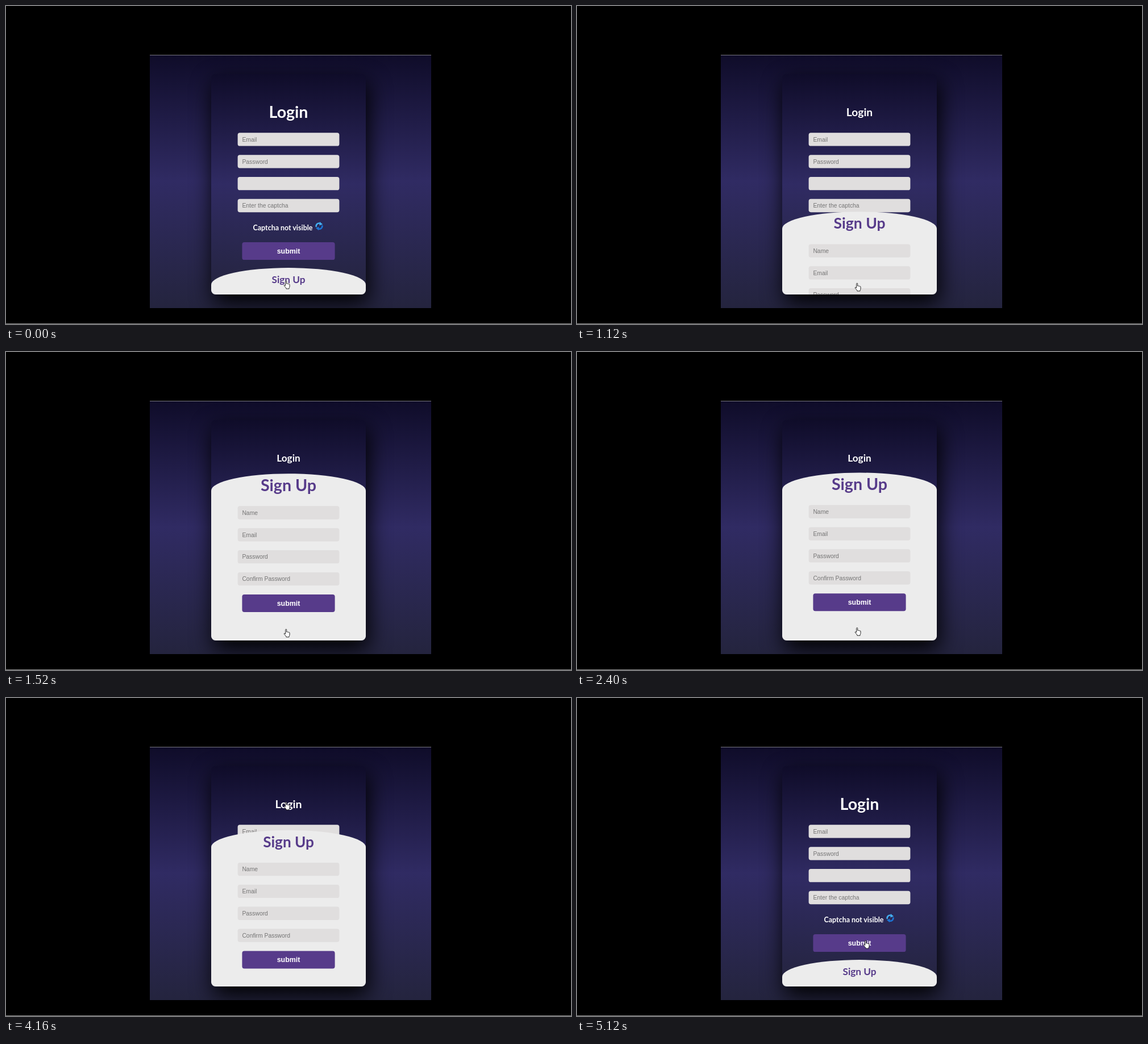
These frames come from a looping animation (994 by 560 pixels, 5.2 s). An HTML page:

```html
<!DOCTYPE html>
<html lang="en">
<head>
<meta charset="utf-8">
<title>Login and sign up</title>
<style>
  html, body { margin: 0; width: 100%; height: 100%; overflow: hidden; background: #000; }
  svg { display: block; width: 994px; height: 560px; }
  text { text-anchor: middle; }
  .title { font: 700 28.6px Lato, sans-serif; }
  .note { font: 700 12.43px Lato, sans-serif; fill: #fff; }
  .hint { font: 10.36px "Liberation Sans", Arial, sans-serif; fill: #757575; text-anchor: start; }
  .action { font: 700 12.43px "Liberation Sans", Arial, sans-serif; fill: #fff; }
  .shadow { filter: blur(19.4px); }
</style>
</head>
<body>
<svg viewBox="0 0 994 560">
  <defs>
    <linearGradient id="night" x2="0" y2="1">
      <stop stop-color="#0f0c29"/>
      <stop offset=".5" stop-color="#302b63"/>
      <stop offset="1" stop-color="#24243e"/>
    </linearGradient>
    <clipPath id="scene"><rect x="253" y="86" width="495" height="446"/></clipPath>
    <clipPath id="card"><rect x="361" y="119.5" width="272" height="388.5" rx="7.8"/></clipPath>
  </defs>
  <rect width="994" height="560"/>
  <rect y="559" width="994" height="1" fill="#8c8c8c"/>
  <g clip-path="url(#scene)">
    <rect x="253" y="86" width="495" height="446" fill="url(#night)"/>
    <rect x="253" y="86" width="495" height="1" fill="#77757f"/>
    <rect class="shadow" x="365" y="135" width="272" height="388.5" rx="7.8"/>
  </g>
  <g clip-path="url(#card)">
    <rect x="361" y="119.5" width="272" height="388.5" fill="url(#night)"/>
    <g id="login" transform="translate(361 166.2)"></g>
    <g id="signup"></g>
  </g>
  <path id="cursor" fill="#fff" stroke="#111" stroke-width=".9" stroke-linejoin="round"
    d="M3.2 9V1.7a1 1 0 0 1 2 0V5.6q.9-.8 1.8.2q1-.6 1.8.4q1.6-.5 1.7 1v3.3q-.2 1.6-1 2.6v1.4H4.4v-1.2L1 9.4q-.7-1.4.5-1.6q.9.1 1.7 1.2z"/>
</svg>
<script>
const LOOP = 5200, STEP = 80;
const $ = id => document.getElementById(id);

const title = (id, label, fill) =>
  `<g id="${id}"><text class="title" y="9.9" fill="${fill}">${label}</text></g>`;
const field = (hint, i) => {
  const y = 57.1 + 38.85 * i;
  return `<rect x="46.6" y="${y}" width="178.8" height="23.3" rx="3.9" fill="#e0dede"/>
    <text class="hint" x="54.4" y="${y + 15.4}">${hint}</text>`;
};
const button = y => `<rect x="54.4" y="${y}" width="163.2" height="31" rx="3.9" fill="#573b8a"/>
  <text class="action" x="136" y="${y + 20}">submit</text>`;
const arrow = (turn, color) => `<g transform="rotate(${turn})" fill="none" stroke="${color}">
  <path stroke-width="2.6" d="M-5.2 1.4A5.2 5.2 0 0 1 1.8-4.7"/>
  <path stroke="none" fill="${color}" d="M1-7.6L6.2-3.2L.2-1.2z"/></g>`;

$('login').innerHTML = title('loginTitle', 'Login', '#fff') +
  ['Email', 'Password', '', 'Enter the captcha'].map(field).join('') +
  '<text class="note" x="126" y="229.2">Captcha not visible</text>' +
  `<g transform="translate(190 221.4)">${arrow(0, '#43aef2')}${arrow(180, '#1c74d4')}</g>` +
  button(249.9);

$('signup').innerHTML = '<path fill="#ececec" d="M0 29.8A136 29.8 0 0 1 272 29.8V357H0z"/>' +
  title('signupTitle', 'Sign Up', '#573b8a') +
  ['Name', 'Email', 'Password', 'Confirm Password'].map(field).join('') +
  button(212.7);

// cubic-bezier(.42, 0, .58, 1), solved by bisection
function easeInOut(x) {
  if (x <= 0) return 0;
  if (x >= 1) return 1;
  let lo = 0, hi = 1, s;
  for (let i = 0; i < 24; i++) {
    s = (lo + hi) / 2;
    const bx = 1.26 * s * (1 - s) ** 2 + 1.74 * s * s * (1 - s) + s ** 3;
    if (bx < x) lo = s; else hi = s;
  }
  return s * s * (3 - 2 * s);
}

const OPEN = 768, CLOSE = 4000;
const opened = (t, duration) =>
  easeInOut((t - OPEN) / duration) - easeInOut((t - CLOSE) / duration);

// Pointer centre: time, x, y
const route = [
  [0, 494, 491], [80, 494, 494], [160, 494, 495], [2320, 494, 495], [2560, 494, 487],
  [2960, 494, 487], [3040, 494, 478], [3200, 493, 370], [3360, 493, 238], [3520, 493, 197],
  [3600, 500, 194], [3680, 494, 190], [4880, 494, 190], [4960, 494, 225],
  [5040, 494, 312], [5120, 509, 434], [5200, 494, 491]
];

function pointer(t) {
  const i = route.findIndex(p => p[0] > t);
  const [t0, x0, y0] = route[i - 1], [t1, x1, y1] = route[i];
  const k = (t - t0) / (t1 - t0);
  return [x0 + (x1 - x0) * k, y0 + (y1 - y0) * k];
}

const place = (id, x, y, scale = 1) =>
  $(id).setAttribute('transform', `translate(${x} ${y}) scale(${scale})`);

function draw(now) {
  const t = Math.floor(now % LOOP / STEP) * STEP;
  const grow = 0.4 * opened(t, 500);
  place('signup', 361, 461.1 - 248.6 * opened(t, 800));
  place('loginTitle', 136, 21, 1 - grow);
  place('signupTitle', 136, 21, 0.6 + grow);
  const [x, y] = pointer(t);
  place('cursor', x - 5.5, y - 7.5);
}

let start;
function tick(now) {
  start ??= now;
  draw(now - start);
  requestAnimationFrame(tick);
}
draw(0);
requestAnimationFrame(tick);
</script>
</body>
</html>
```
